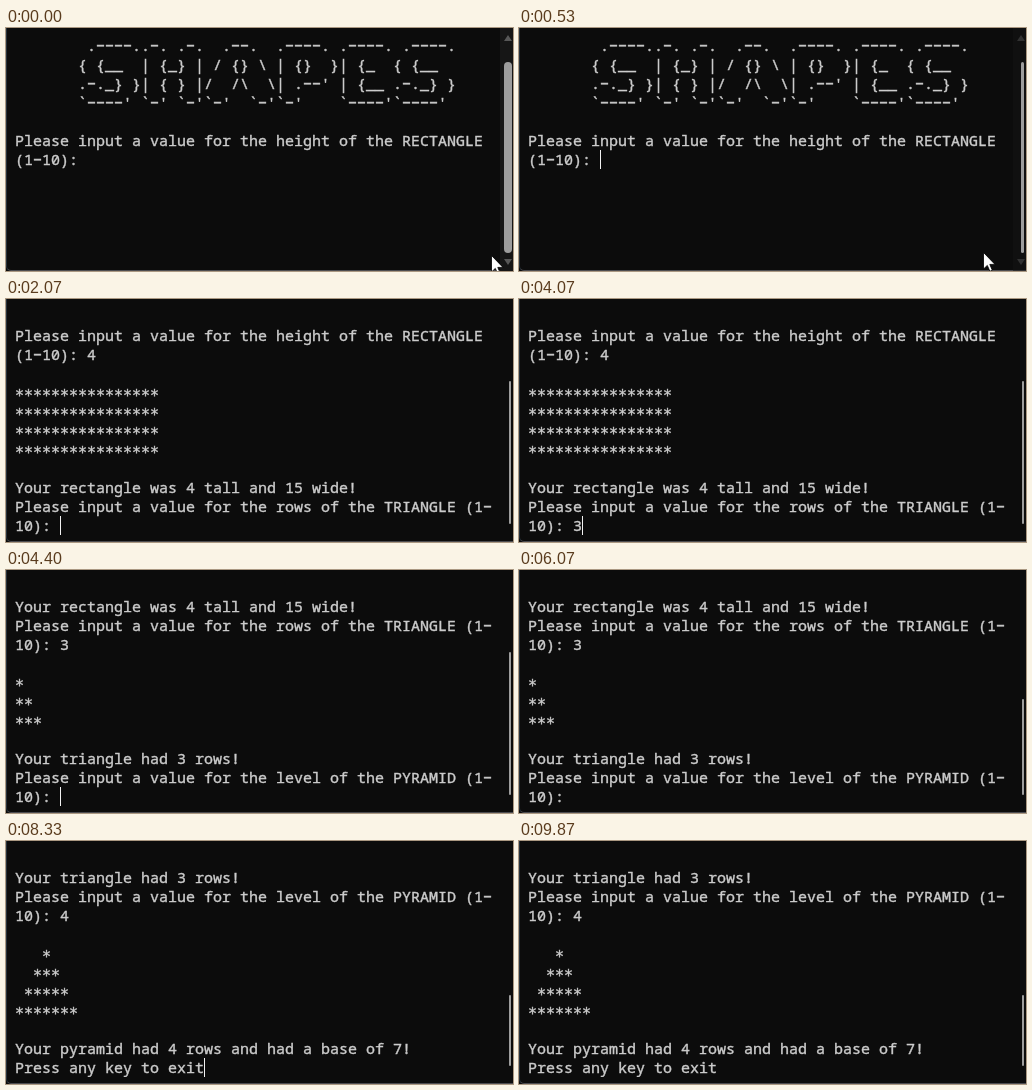
Animation, 507 px wide and 243 px high, one loop 10 s. Source, as an HTML page:

```html
<!DOCTYPE html>
<html lang="en">
<head>
<meta charset="utf-8">
<title>Shapes in a terminal</title>
<style>
  html, body { margin: 0; width: 100%; height: 100%; overflow: hidden; background: #0c0c0c; }
  .stage { position: relative; width: 507px; height: 243px; overflow: hidden; background: #0c0c0c; }
  .stage > * { position: absolute; }
  .edge {
    left: 0; top: -9px; width: 520px; height: 251px; border: solid #27323c; border-width: 0 0 1px 1px;
    border-bottom-color: #4c4c50; border-bottom-left-radius: 5px;
  }

  /* every animation shares one 10 s clock */
  .view, .buffer, .key, .caret, .track, .thumb, .pointer {
    animation: 10s step-end -10ms infinite;
  }

  .view { left: 9px; top: 8px; width: 485px; overflow: hidden; animation-name: view; }
  .buffer {
    margin: 0; color: #ccc; animation-name: scroll;
    font: 15px/19px "Noto Sans Mono", "DejaVu Sans Mono", monospace;
    font-variant-ligatures: none;
    -webkit-text-stroke: .4px #ccc;
  }
  .stars {
    position: relative; top: 3px; line-height: 0; letter-spacing: -.03px;
    font-family: "DejaVu Sans Mono", monospace;
  }
  .height { animation-name: type-height; }
  .rows { animation-name: type-rows; }
  .level { animation-name: type-level; }
  .caret { width: 1px; height: 19px; background: #f2f2f2; animation-name: caret-place, caret-blink; }

  .track { left: 494px; top: 0; width: 13px; height: 243px; background: #161616;
    animation-name: track; animation-timing-function: linear; }
  .track svg { position: absolute; left: 0; top: 0; fill: #585858; }
  .thumb { bottom: 18px; border-radius: 4px; background: #9d9d9d;
    animation-name: thumb-width, thumb-top; animation-timing-function: linear, step-end; }
  .pointer { left: 0; top: 0; overflow: visible; animation-name: pointer; }

  @keyframes view { 0% { height: 133px } 20%, 100% { height: 228px } }
  @keyframes scroll {
    0% { transform: translateY(0) }
    20% { transform: translateY(-76px) }
    44% { transform: translateY(-228px) }
    72%, 100% { transform: translateY(-380px) }
  }
  @keyframes type-height { 0% { opacity: 0 } 16%, 100% { opacity: 1 } }
  @keyframes type-rows { 0% { opacity: 0 } 40.7%, 100% { opacity: 1 } }
  @keyframes type-level { 0% { opacity: 0 } 68.7%, 100% { opacity: 1 } }

  @keyframes caret-place {
    0% { left: 81px; top: 122px }
    16% { left: 90px; top: 122px }
    20%, 44% { left: 54px; top: 217px }
    40.7%, 68.7% { left: 63px; top: 217px }
    72%, 100% { left: 198px; top: 217px }
  }
  @keyframes caret-blink {
    0%, 11.3%, 26%, 36.7%, 50%, 60.7%, 77.3%, 88.7%, 98.7%, 100% { opacity: 0 }
    5.3%, 16%, 31.3%, 40.7%, 55.3%, 66.7%, 83.3%, 94% { opacity: 1 }
  }

  @keyframes track { 0%, 2.7% { opacity: 1 } 8%, 100% { opacity: 0 } }
  @keyframes thumb-width {
    0%, 2.7% { left: 498px; width: 8px }
    5.3%, 11.3% { left: 502px; width: 3px }
    12.7%, 100% { left: 503px; width: 2px }
  }
  @keyframes thumb-top {
    0% { top: 34px }
    20.7% { top: 82px }
    44.7% { top: 129px }
    72%, 100% { top: 154px }
  }
  @keyframes pointer {
    0% { transform: translate(485px, 227px) }
    .7% { transform: translate(440px, 201px) }
    1.3% { transform: translate(416px, 186px) }
    2.7% { transform: translate(421px, 190px) }
    3.3% { transform: translate(430px, 198px) }
    4% { transform: translate(442px, 207px) }
    4.7% { transform: translate(454px, 216px) }
    5.3% { transform: translate(464px, 224px) }
    6% { transform: translate(472px, 236px) }
    6.7%, 100% { transform: translate(480px, 260px) }
  }
</style>
</head>
<body>
<div class="stage">
  <div class="edge"></div>
  <div class="view"><pre class="buffer">
        .−−−−..−. .−.  .−−.  .−−−−. .−−−−. .−−−−.
       { {__  | {_} | / {} \ | {}  }| {_  { {__
       .−._} }| { } |/  /\  \| .−−' | {__ .−._} }
       `−−−−' `−' `−'`−'  `−'`−'    `−−−−'`−−−−'

Please input a value for the height of the RECTANGLE
(1−10): <span class="key height">4</span>

<span class="stars">****************
****************
****************
****************</span>

Your rectangle was 4 tall and 15 wide!
Please input a value for the rows of the TRIANGLE (1−
10): <span class="key rows">3</span>

<span class="stars">*
**
***</span>

Your triangle had 3 rows!
Please input a value for the level of the PYRAMID (1−
10): <span class="key level">4</span>

<span class="stars">   *
  ***
 *****
*******</span>

Your pyramid had 4 rows and had a base of 7!
Press any key to exit</pre></div>
  <div class="caret"></div>
  <div class="track"><svg width="13" height="243"><path d="M4 13h8l-4-6zM4 231h8l-4 6z"/></svg></div>
  <div class="thumb"></div>
  <svg class="pointer" width="12" height="20">
    <path d="M.5 .5V17L4.3 13.4 6.9 19.3 9.3 18.2 6.8 12.4H12z" fill="#fff" stroke="#000" stroke-width=".8"/>
  </svg>
</div>
</body>
</html>
```
